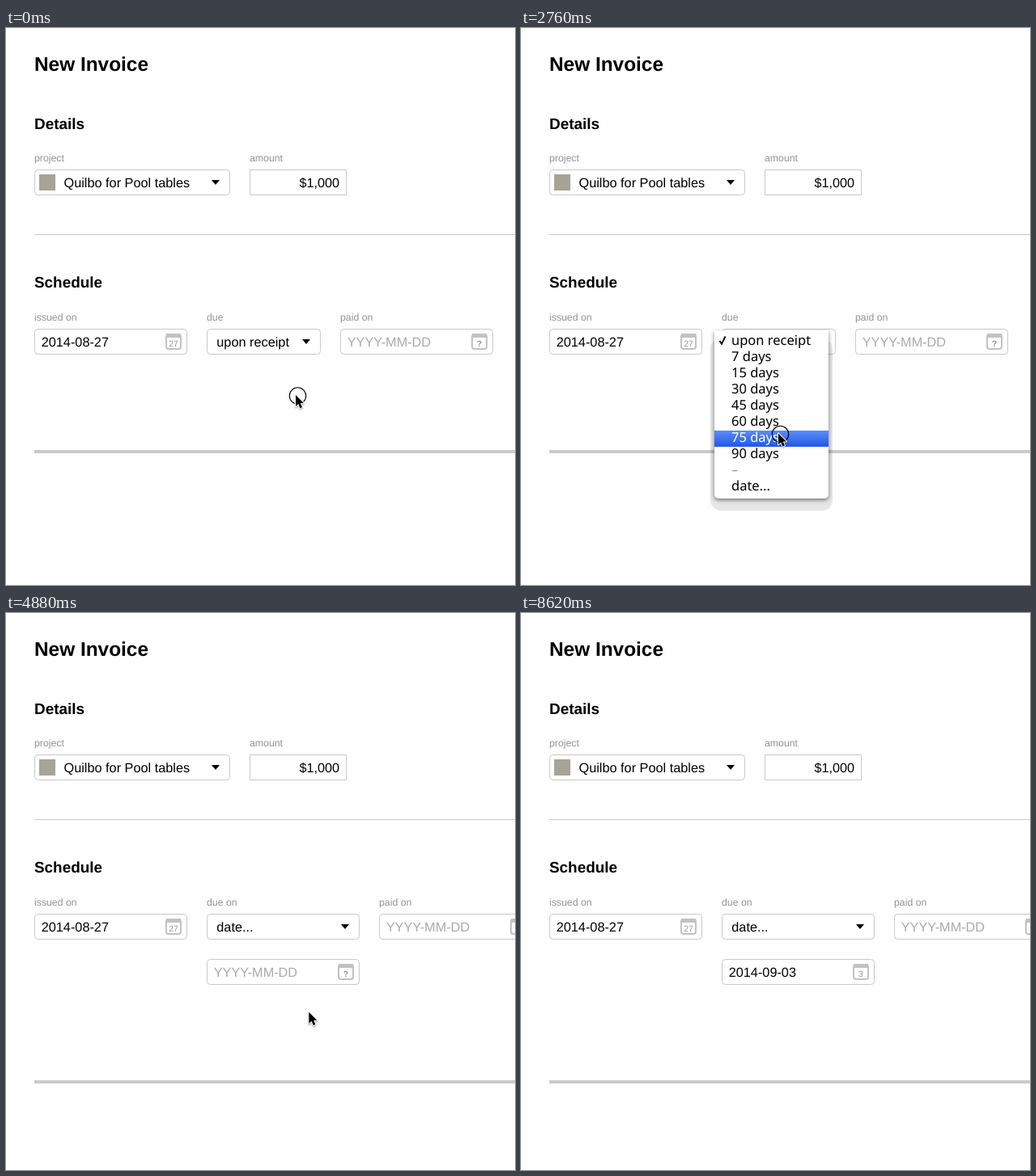
Write an HTML page with a canvas that moves like this. It is 629 by 689 pixels and loops after 9020 ms.

```html
<!DOCTYPE html>
<html lang="en">
<head>
<meta charset="utf-8">
<title>New Invoice</title>
<style>
  html, body { margin: 0; width: 100%; height: 100%; overflow: hidden; background: #fefefe; }
  canvas { display: block; }
</style>
</head>
<body>
<canvas id="stage" width="629" height="689"></canvas>
<script>
const LOOP = 9020;
const SANS = '"Liberation Sans", Arial, sans-serif';
const MENU_FONT = '16.5px "Noto Sans", sans-serif';
const GRAY = '#c9c9c9', PAPER = '#fefefe';
const c = document.getElementById('stage').getContext('2d');
c.textRendering = 'geometricPrecision';

const ITEMS = ['upon receipt', '7 days', '15 days', '30 days', '45 days',
  '60 days', '75 days', '90 days', '–', 'date...'];
const ARROW = new Path2D('M0 0V14L3.2 11L5.5 16.2L8 15.1L5.8 10H10Z');
const HAND = new Path2D('M4.5 1.3Q6 0 7 1.8L8 6Q9.5 5.3 10.2 6.6Q11.8 6 12.3 7.4' +
  'Q14 7 14.3 9Q14.6 12 13 15L12.8 17.5H6.5L6 16Q4 13.5 1.2 10.2Q.3 8.6 2 8.3' +
  'Q3.5 8.4 5 10L3.8 3Q3.6 2 4.5 1.3Z');
const KNUCKLES = new Path2D('M7.7 11v4M9.8 11v4M11.8 11v4');

const smooth = p => p * p * (3 - 2 * p);
const speedUp = p => p * p;
const slowDown = p => p * (2 - p);

// start, end, number of steps, target x, target y, easing
const MOVES = [
  [50, 630, 10, 341.5, 394.5, smooth],
  [2000, 2870, 16, 314, 535.5, speedUp],
  [2930, 3220, 6, 308.5, 567, slowDown],
  [3700, 3700, 1, 308.5, 568, smooth],
  [4410, 5290, 16, 419.5, 443, smooth],
  [5340, 5340, 1, 421, 443, smooth],
  [5880, 5880, 1, 420, 443, smooth],
  [6230, 6230, 1, 418.5, 443, smooth],
  [6410, 6970, 11, 418, 400, smooth],
  [7610, 7610, 1, 415.5, 401, smooth],
  [8090, 8620, 9, 641, 754, speedUp]
];

// Progress 0..1 in n jumps, the first at a and the last at b
function steps(t, a, b, n) {
  if (t < a) return 0;
  if (t >= b) return 1;
  return Math.floor((t - a) / (b - a) * (n - 1) + 1.001) / n;
}

function pointerAt(t) {
  let x = 360.5, y = 455;
  for (const [a, b, n, tx, ty, ease] of MOVES) {
    const p = ease(steps(t, a, b, n));
    x += (tx - x) * p;
    y += (ty - y) * p;
  }
  return { x, y };
}

function text(s, x, y, size, color = '#000', weight = '', align = 'left') {
  c.font = `${weight} ${size}px ${SANS}`;
  c.fillStyle = color;
  c.textAlign = align;
  c.fillText(s, x, y);
}

const label = (s, x, y) => text(s, x, y, 12.3, '#949494');

function rect(x, y, w, h, color) {
  c.fillStyle = color;
  c.fillRect(x, y, w, h);
}

function box(x, y, w, radius = 4) {
  c.beginPath();
  c.roundRect(x + .5, y + .5, w - 1, 31, radius);
  c.fillStyle = '#fff';
  c.fill();
  c.strokeStyle = GRAY;
  c.lineWidth = 1;
  c.stroke();
}

function select(s, x, y, w, textX) {
  box(x, y, w);
  text(s, textX, y + 22, 16.3);
  const r = x + w - 23;
  c.beginPath();
  c.moveTo(r, y + 13);
  c.lineTo(r + 10, y + 13);
  c.lineTo(r + 5, y + 19);
  c.fill();
}

function dateField(x, y, value, day) {
  box(x, y, 189);
  text(value || 'YYYY-MM-DD', x + 8.7, y + 22, 16.3, value ? '#000' : '#aaa');
  const l = x + 162;
  c.beginPath();
  c.roundRect(l + 1, y + 7, 18, 18, 3);
  c.strokeStyle = '#c2c2c2';
  c.lineWidth = 2;
  c.stroke();
  rect(l + 1, y + 6, 18, 5, '#c2c2c2');
  text(day, l + 10, y + 21.5, 10.5, '#999', day === '?' ? 'bold' : '', 'center');
}

function form(t) {
  const dated = t >= 4240;
  text('New Invoice', 35, 53, 24.4, '#000', 'bold');
  text('Details', 35, 125, 18.9, '#000', 'bold');
  label('project', 35, 165);
  select('Quilbo for Pool tables', 35, 175, 242, 71.5);
  rect(41, 181, 20, 20, '#a6a397');
  label('amount', 301, 165);
  box(301, 175, 120, 0);
  text('$1,000', 412, 197, 16.2, '#000', '', 'right');
  rect(35, 255, 594, 1, GRAY);

  text('Schedule', 35, 321, 18.9, '#000', 'bold');
  label('issued on', 35, 362);
  dateField(35, 372, '2014-08-27', '27');
  label(dated ? 'due on' : 'due', 248, 362);
  select(dated ? 'date...' : 'upon receipt', 248, 372, dated ? 189 : 141, 260.3);
  const paidX = dated ? 461 : 413;
  label('paid on', paidX, 362);
  dateField(paidX, 372, '', '?');
  if (dated) {
    const picked = t >= 7200;
    dateField(248, 428, picked ? '2014-09-03' : '', picked ? '3' : '?');
  }
  rect(35, dated ? 578 : 522, 594, 4, '#cacaca');
}

function menu(alpha, pointerY) {
  c.save();
  c.globalAlpha = alpha;
  c.beginPath();
  c.roundRect(234, 384, 151, 213, 13);
  c.fillStyle = 'rgba(0,0,0,.09)';
  c.fill();
  c.beginPath();
  c.roundRect(239, 374, 141, 208, [0, 0, 5, 5]);
  c.shadowColor = 'rgba(0,0,0,.5)';
  c.shadowBlur = 5;
  c.shadowOffsetY = 2;
  c.fillStyle = '#fefefe';
  c.fill();
  c.shadowColor = 'transparent';

  const active = Math.floor((pointerY - 379) / 20 + .05);
  ITEMS.forEach((item, i) => {
    const top = 378 + 20 * i, disabled = item === '–';
    const on = i === Math.max(0, active) && !disabled;
    if (on) {
      const g = c.createLinearGradient(0, top, 0, top + 20);
      g.addColorStop(0, '#5c8cfa');
      g.addColorStop(1, '#1f57ea');
      rect(239, top, 141, 20, g);
    }
    c.font = MENU_FONT;
    c.textAlign = 'left';
    c.fillStyle = on ? '#fff' : disabled ? '#999' : '#000';
    c.fillText(item, 260, top + 14);
    if (i === 0) {
      c.beginPath();
      c.moveTo(245.5, 387);
      c.lineTo(248, 391);
      c.lineTo(252.5, 381.5);
      c.strokeStyle = c.fillStyle;
      c.lineWidth = 1.8;
      c.stroke();
    }
  });
  c.restore();
}

function chevron(x, dir) {
  c.beginPath();
  c.moveTo(x + 2.5 * dir, 185);
  c.lineTo(x - 2.5 * dir, 190);
  c.lineTo(x + 2.5 * dir, 195);
  c.strokeStyle = '#000';
  c.lineWidth = 2.8;
  c.stroke();
}

function calendar(alpha, hover) {
  c.save();
  c.globalAlpha = alpha;
  rect(437, 422, 93, 29, '#fafafa');
  c.beginPath();
  c.moveTo(309.5, 174.5);
  c.lineTo(529.5, 174.5);
  c.lineTo(529.5, 421.5);
  c.lineTo(431, 421.5);
  c.lineTo(420.5, 432.5);
  c.lineTo(410, 421.5);
  c.lineTo(309.5, 421.5);
  c.closePath();
  c.fillStyle = '#fafafa';
  c.fill();
  c.strokeStyle = GRAY;
  c.lineWidth = 1;
  c.stroke();

  chevron(324.5, 1);
  chevron(514.5, -1);
  text('August 2014', 419.5, 196, 14, '#000', 'bold', 'center');
  ['Su', 'Mo', 'Tu', 'We', 'Th', 'Fr', 'Sa'].forEach((d, i) =>
    text(d, 332.5 + 29 * i, 229, 12, '#000', 'bold', 'center'));

  for (let i = 0; i < 42; i++) {
    const x = 332.5 + 29 * (i % 7), y = 253 + 29 * Math.floor(i / 7);
    const n = i - 4, outside = n < 1 || n > 31;
    const day = n < 1 ? n + 31 : n > 31 ? n - 31 : n;
    const on = hover && n === 34, today = n === 27;
    if (on) rect(405, 384, 29, 29, '#000');
    const color = on ? '#fff' : today ? '#7ccb2c' : outside ? '#999' : '#000';
    text(day, x, y + 5, 14, color, on || today || outside ? 'bold' : '', 'center');
  }
  c.restore();
}

function cursor(t, { x, y }) {
  const pressed = t < 3700;
  const hand = t > 4410 && t < 7610 && y < 460;
  c.save();
  c.lineJoin = 'round';
  if (pressed) {
    c.beginPath();
    c.arc(x, y, 10.2, 0, 7);
    c.strokeStyle = '#000';
    c.lineWidth = 1.1;
    c.stroke();
    x -= 2.5;
    y -= 1;
  }
  c.translate(hand ? x - 5.5 : x, y);
  if (hand) {
    c.fillStyle = '#fff';
    c.fill(HAND);
    c.strokeStyle = '#000';
    c.lineWidth = 1.2;
    c.stroke(HAND);
    c.lineWidth = .9;
    c.stroke(KNUCKLES);
  } else {
    c.shadowColor = 'rgba(0,0,0,.4)';
    c.shadowBlur = 2;
    c.shadowOffsetY = 1;
    c.strokeStyle = '#fff';
    c.lineWidth = 2;
    c.stroke(ARROW);
    c.shadowColor = 'transparent';
    c.fillStyle = '#000';
    c.fill(ARROW);
  }
  c.restore();
}

function draw(now) {
  const t = now % LOOP;
  const p = pointerAt(t);
  rect(0, 0, 629, 689, PAPER);
  form(t);
  const menuAlpha = steps(t, 810, 920, 3) * (1 - .935 * steps(t, 3940, 4180, 5));
  if (t >= 810 && t < 4240) menu(menuAlpha, p.y);
  const calendarAlpha = steps(t, 5340, 5580, 4) - steps(t, 7200, 7310, 3);
  if (calendarAlpha > 0) calendar(calendarAlpha, p.y < 413);
  cursor(t, p);
}

const start = performance.now();
function tick() {
  draw(performance.now() - start);
  requestAnimationFrame(tick);
}
tick();
</script>
</body>
</html>
```
